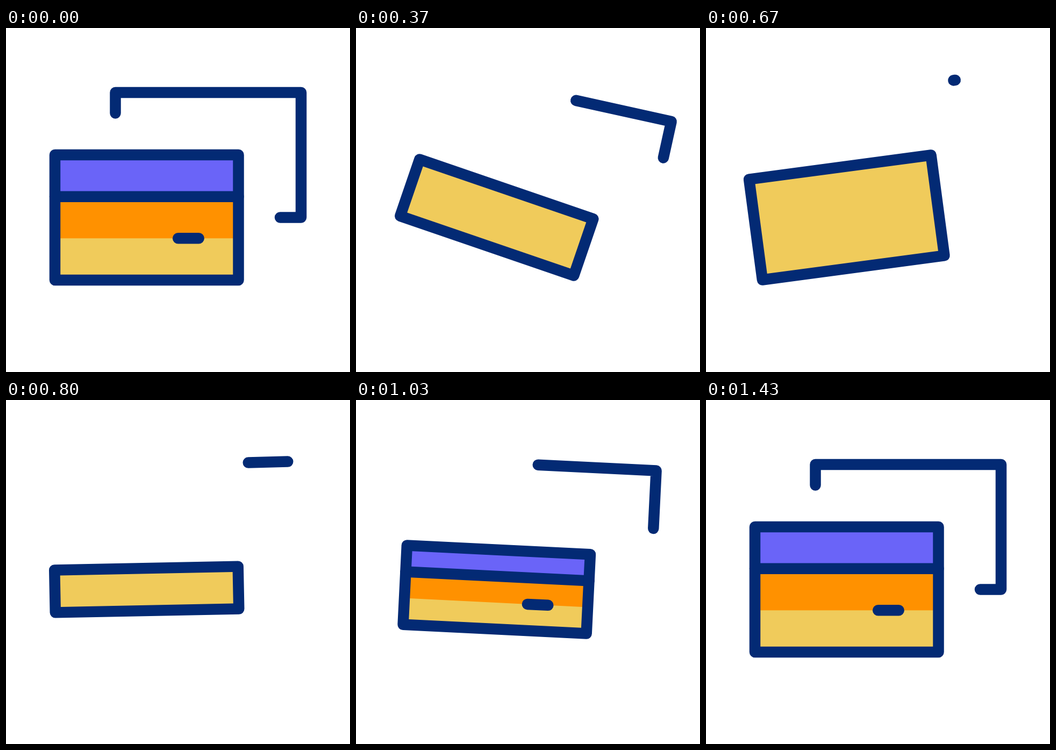
These frames come from a looping animation (640 by 640 pixels, 2 s). An HTML page with a canvas:

```html
<!DOCTYPE html>
<html lang="en">
<head>
<meta charset="utf-8">
<title>Flipping cards</title>
<style>
  html, body { margin: 0; width: 100%; height: 100%; overflow: hidden; background: #fff; }
  canvas { display: block; width: 640px; height: 640px; }
</style>
</head>
<body>
<canvas id="stage" width="640" height="640"></canvas>
<script>
const ctx = document.getElementById('stage').getContext('2d');
const NAVY = '#032a74', PURPLE = '#6a64f8', ORANGE = '#ff9100', YELLOW = '#f0cb5b';
const LOOP = 2000, FPS = 30, LAST_STEP = 43;

// Keys are [step, value], eased in and out between neighbours.
const FLIP = [[0.7, 1], [16.15, -0.995], [36.6, 1]];
const CARD_TILT = [[0, 0], [12.6, 19.8], [17.7, -9], [29.4, 5.1], [33.6, -1.9], [41.5, 0]];
const BACK_TILT = [[0, 0], [12.6, 13], [17.7, -9.8], [29.4, 5.1], [33.6, -1.9], [41.5, 0]];
const TRIM = [[0, 0], [19, 1], [43, 0]];

const HALF_W = 170.75, HALF_H = 116.5, BAND = 38.8;
const OUTLINE = [[203.5, 158.5], [203.5, 120], [549, 120], [549, 352.5], [510, 352.5]];
const OUTLINE_LENGTH = 655.5;

function valueAt(keys, step) {
  if (step <= keys[0][0]) return keys[0][1];
  for (let i = 1; i < keys.length; i++) {
    const [start, from] = keys[i - 1], [end, to] = keys[i];
    if (step < end) {
      const u = (step - start) / (end - start);
      return from + (to - from) * u * u * (3 - 2 * u);
    }
  }
  return keys[keys.length - 1][1];
}

function rotated(x, y, degrees, draw) {
  ctx.save();
  ctx.translate(x, y);
  ctx.rotate(degrees * Math.PI / 180);
  draw();
  ctx.restore();
}

function strokePath(points) {
  ctx.beginPath();
  points.forEach(([x, y]) => ctx.lineTo(x, y));
  ctx.stroke();
}

// The part of a polyline between two distances along it.
function slice(points, from, to) {
  const part = [];
  let walked = 0;
  for (let i = 1; i < points.length; i++) {
    const [ax, ay] = points[i - 1], [bx, by] = points[i];
    const length = Math.hypot(bx - ax, by - ay);
    const a = Math.max(from - walked, 0), b = Math.min(to - walked, length);
    if (a < b) {
      for (const d of [a, b]) part.push([ax + (bx - ax) * d / length, ay + (by - ay) * d / length]);
    }
    walked += length;
  }
  return part;
}

function drawBackCard(step) {
  const cut = Math.min(valueAt(TRIM, step), 0.998) * OUTLINE_LENGTH / 2;
  rotated(320, 320, valueAt(BACK_TILT, step), () => {
    ctx.translate(-320, -320);
    strokePath(slice(OUTLINE, cut, OUTLINE_LENGTH - cut));
  });
}

function drawCard(step) {
  const flip = valueAt(FLIP, step), scale = Math.abs(flip);
  const h = HALF_H * scale, band = BAND * scale;
  const fill = (color, top, bottom) => {
    ctx.fillStyle = color;
    ctx.fillRect(-HALF_W, top, HALF_W * 2, bottom - top);
  };
  rotated(261.75, 352.5, valueAt(CARD_TILT, step), () => {
    fill(YELLOW, -h, h);
    if (flip > 0) {
      fill(PURPLE, -h, -band);
      fill(ORANGE, -band, band);
      strokePath([[-HALF_W, -band], [HALF_W, -band]]);
      strokePath([[58.4, band], [96.9, band]]);
    }
    ctx.strokeRect(-HALF_W, -h, HALF_W * 2, h * 2);
  });
}

function render(now) {
  const step = Math.min(Math.floor(now % LOOP * FPS / 1000 + 0.11), LAST_STEP);
  ctx.clearRect(0, 0, 640, 640);
  ctx.strokeStyle = NAVY;
  ctx.lineWidth = 20.5;
  ctx.lineCap = ctx.lineJoin = 'round';
  drawBackCard(step);
  drawCard(step);
}

const origin = performance.now();
function tick() {
  render(performance.now() - origin);
  requestAnimationFrame(tick);
}
tick();
</script>
</body>
</html>
```
